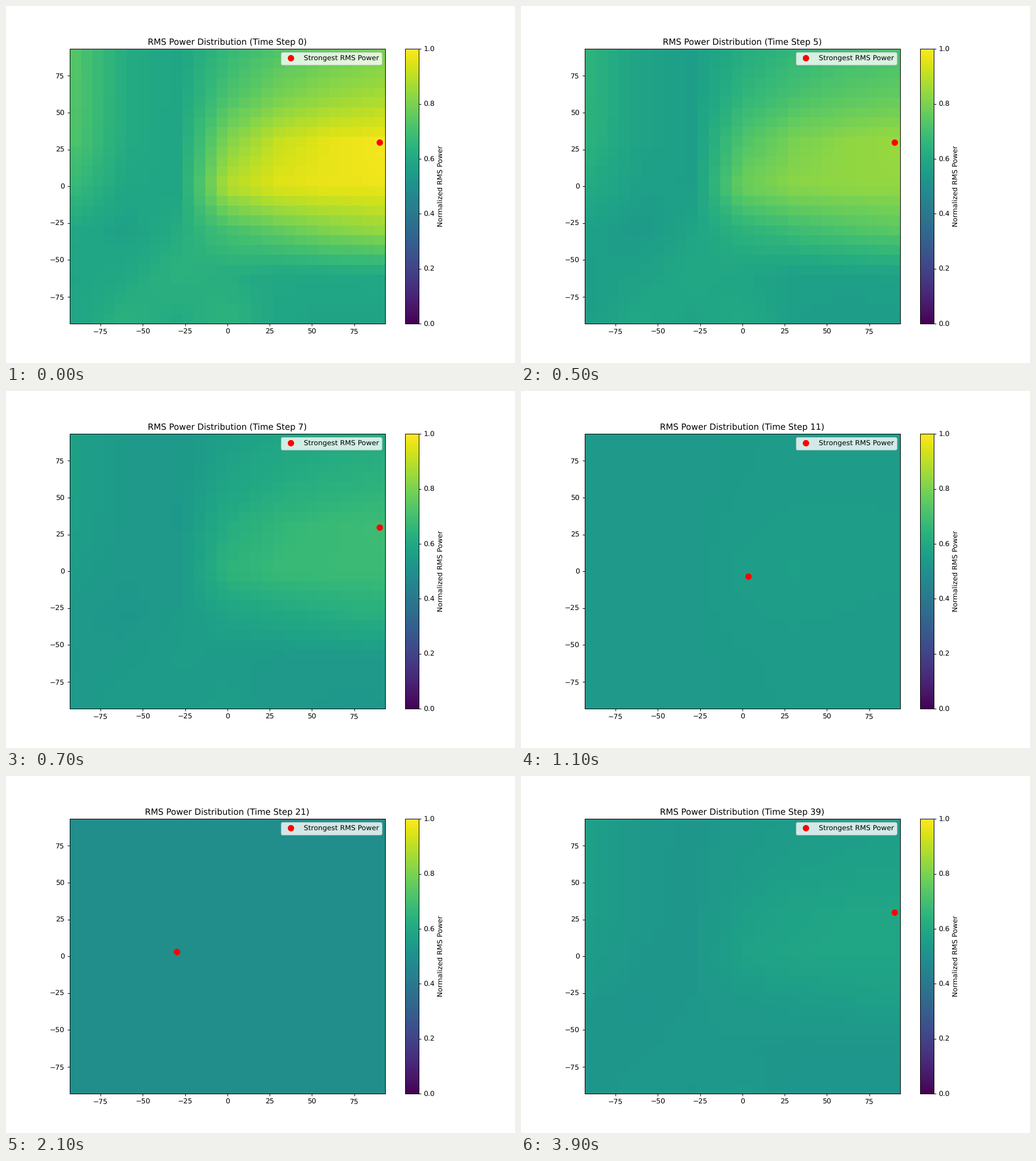
Animation of 894x626 px, one loop 4 s. Source, as a matplotlib script:

```python
import numpy as np
import matplotlib.pyplot as plt
from matplotlib.animation import FuncAnimation

WIDTH, HEIGHT, DPI = 894, 626, 89.4
FRAMES, INTERVAL = 40, 100
CELLS = 28
FLOOR = 0.578

plt.rcParams["text.hinting"] = "none"

# Sensors sit every 30 units; the map interpolates between them.
coords = np.linspace(-90, 90, CELLS)
half_cell = 90 / (CELLS - 1)
limit = 90 + half_cell
nodes = np.linspace(-90, 90, 7)
hat = np.clip(1 - np.abs(coords[:, None] - nodes) / 30, 0, None)
X, Y = np.meshgrid(nodes, nodes)


def spread(grid):
    return hat @ grid @ hat.T


def bump(x, y, size):
    return np.exp(-((X - x) ** 2 + (Y - y) ** 2) / (2 * size ** 2))


def logistic(v):
    return 1 / (1 + np.exp(-v))


def lobe():
    """Strong area: opens to the right, with a sharp lower edge."""
    length = 20 + np.where(Y > 0, 0.6, 2) * np.abs(Y)
    reach = np.clip(X + 30, 0, None)
    rise = (1 - np.exp(-reach / length)) / (1 - np.exp(-120 / length))
    height = 0.2 + 0.225 * np.exp(-((Y - 17) / 45) ** 2)
    return height * rise * logistic((Y + 48) / 6)


ridge = (0.07 * bump(-30, -50, 22) + 0.055 * bump(-60, -90, 16)
         + 0.065 * bump(0, -90, 16) - 0.035 * bump(-60, -30, 18))
main = spread(lobe() + ridge)
left = spread(0.15 * np.exp(-(X + 90) / 22) * logistic((Y + 8) / 16))
center = spread(0.012 * bump(15, -3, 28) + 0.007 * np.tanh((X + 10) / 40))
west = spread(0.005 * bump(-30, 10, 35) - 0.004 * np.tanh((X - 40) / 40))
late = 0.525 + 0.16 * main + 0.28 * left

CENTER = (half_cell, -half_cell)
WEST = (-30, half_cell)
CORNER = (-90, -90)
EAST = (90, 30)
# (first step, strongest position)
PEAKS = [(0, EAST), (10, CENTER), (13, CORNER), (17, EAST),
         (20, WEST), (25, CORNER), (30, WEST), (34, EAST)]


def power(step):
    base = np.interp(step, [0, 5, 7, 11, 21, 29],
                     [FLOOR, 0.555, 0.533, 0.542, 0.495, 0.545])
    gain = np.exp(-(step / 7.05) ** 3.2)
    field = base + gain * main + gain ** 1.5 * left
    field += np.interp(step, [7, 11, 20], [0, 1, 0]) * center
    field += np.interp(step, [21, 29], [0, 1]) * west
    blend = np.interp(step, [29, 39], [0, 1])
    return (1 - blend) * field + blend * late


def peak(step):
    return [pos for start, pos in PEAKS if start <= step][-1]


# The tiny margin keeps the pixel size from rounding down.
fig, ax = plt.subplots(
    figsize=((WIDTH + 1e-4) / DPI, (HEIGHT + 1e-4) / DPI), dpi=DPI)
image = ax.imshow(power(0), cmap="viridis", vmin=0, vmax=1, origin="lower",
                  aspect="auto", interpolation="nearest",
                  extent=(-limit, limit, -limit, limit))
fig.colorbar(image, ax=ax, label="Normalized RMS Power")
dot, = ax.plot([EAST[0]], [EAST[1]], "ro", markersize=8,
               label="Strongest RMS Power")
ax.set_xlim(-limit, limit)
ax.set_ylim(-limit, limit)
ax.legend(loc="upper right")
title = ax.set_title("")


def update(step):
    image.set_data(power(step))
    x, y = peak(step)
    dot.set_data([x], [y])
    title.set_text(f"RMS Power Distribution (Time Step {step})")
    return image, dot, title


anim = FuncAnimation(fig, update, frames=FRAMES, interval=INTERVAL,
                     repeat=True, repeat_delay=0, blit=False)
plt.show()
```
